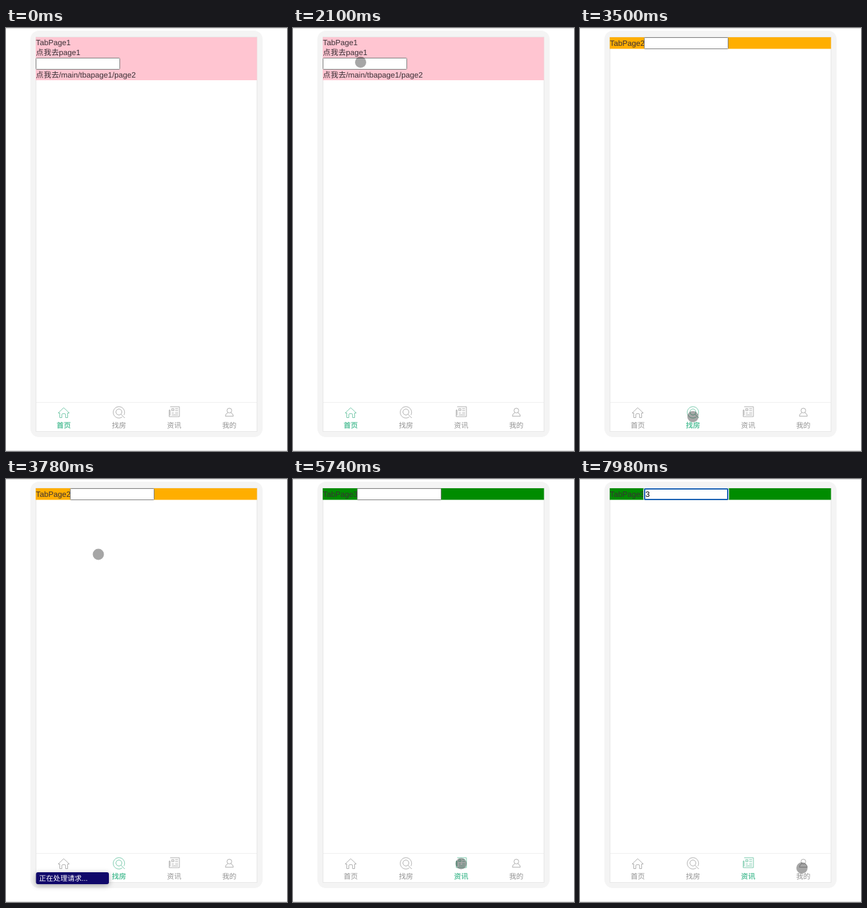
Recreate the animation shown at these times as an HTML page. Size 426x640 px, loop 8000 ms.

```html
<!DOCTYPE html>
<html lang="zh">
<head>
<meta charset="utf-8">
<title>Tab pages</title>
<style>
  html, body { margin: 0; height: 100%; overflow: hidden; background: #fff; }
  svg { display: block; width: 100%; height: 100%; }
  text {
    font: 11.7px "Liberation Sans", "Noto Sans CJK SC", "Noto Sans CJK", sans-serif;
    fill: #3a3036;
    text-rendering: geometricPrecision;
  }
  .page, .ring, .caret, .value, #toast, #dot { visibility: hidden; }
  .box { fill: #fff; stroke: #808080; }
  .ring { fill: #fff; stroke: #1c62b4; stroke-width: 2; }
  .ring .gap { fill: none; stroke: #fff; stroke-width: 1; }
  .value { fill: #000; }
  .caret { stroke: #333; }
  .tab { color: #a8a8a8; }
  .tab path, .tab circle, .tab rect { fill: none; stroke: currentColor; stroke-width: .9; }
  .tab text, #toast text { font-size: 10.8px; }
  .tab text { fill: #929292; text-anchor: middle; }
  .tab.on { color: #6cc5a4; }
  .tab.on text { fill: #5cc39e; font-weight: bold; }
  #toast rect { fill: #10086a; filter: drop-shadow(0 2px 4px rgba(0, 0, 0, .35)); }
  #toast text { fill: #fff; }
</style>
</head>
<body>
<svg viewBox="0 0 426 640">
  <path d="M0 .5H426M0 639.5H426" stroke="#dcdcdc"/>
  <rect x="37" y="4" width="352" height="615" rx="13" fill="#f4f4f4"/>
  <rect x="45.5" y="13.5" width="335" height="597" fill="#fff" stroke="#e8e8e8"/>

  <g class="page">
    <rect x="45" y="14" width="335.5" height="65" fill="#ffc5d1"/>
    <text x="45.3" y="25.5">TabPage1</text>
    <text x="45.3" y="41.2">点我去page1</text>
    <text x="45.3" y="75.2">点我去/main/tbapage1/page2</text>
    <g class="field" transform="translate(45 45)"></g>
  </g>
  <g class="page">
    <rect x="45" y="14" width="335.5" height="17.5" fill="#ffae00"/>
    <text x="45.3" y="26.8">TabPage2</text>
    <g class="field" transform="translate(97 14)"></g>
  </g>
  <g class="page">
    <rect x="45" y="14" width="335.5" height="17.5" fill="#008c00"/>
    <text x="45.3" y="26.8">TabPage3</text>
    <g class="field" transform="translate(97 14)"></g>
  </g>

  <path d="M46 566.5H380" stroke="#f0f0f0"/>
  <g class="tab">
    <path d="M-8.5 1L0-7 8.5 1H6V8H2.8V3.5Q2.8 2 1.3 2H-1.3Q-2.8 2-2.8 3.5V8H-6V1Z" stroke-linejoin="round"/>
    <text y="23">首页</text>
  </g>
  <g class="tab">
    <path d="M5 7A8.6 8.6 0 1 1 7.6 4M3.2 2.8L8 8H9"/>
    <circle cy="-.5" r="4.5"/>
    <text y="23">找房</text>
  </g>
  <g class="tab">
    <path d="M-6-8.5H8V6.5H-7.5V-3.5H-6V4.5M1.5-5.5H6M1.5-2.5H6M-3.5 1H-.5M1.5 1H6M-3.5 3.8H6"/>
    <rect x="-3.5" y="-5.5" width="3" height="3"/>
    <text y="23">资讯</text>
  </g>
  <g class="tab">
    <circle cy="-2.7" r="3.6"/>
    <path d="M-2.2 .5Q-6 2-6 5.8H6Q6 2 2.2 .5" stroke-linejoin="round"/>
    <text y="23">我的</text>
  </g>

  <g id="toast">
    <rect x="45.5" y="595" width="110.5" height="18" rx="3"/>
    <text x="50" y="608">正在处理请求...</text>
  </g>
  <circle id="dot" r="8.5" fill="#000" fill-opacity=".35"/>
</svg>
<script>
const LOOP = 8000, STEP = 70, APPEAR = 280;
const tabX = i => 87.5 + 83.7 * i;

const pages = [
  { from: 0, focus: 2310, typed: 2650 },
  { from: 3500, focus: 4620, typed: 4750 },
  { from: 5740, focus: 6860, typed: 6990 }
];

// Pointer gestures; it rests where the last one ended
const moves = [
  { at: 280, ms: 70, to: [97, 147] },
  { at: 490, ms: 420, to: [117, 54] },
  { at: 1890, ms: 210, to: [102.5, 51.7] },
  { at: 2380, ms: 420, to: [150.5, 509] },
  { at: 2870, ms: 350, to: [tabX(1), 588] },
  { at: 3500, ms: 280, to: [140, 114] },
  { at: 3780, ms: 490, to: [127, 22] },
  { at: 4690, ms: 140, to: [127, 74.5] },
  { at: 5110, ms: 420, to: [tabX(2), 582] },
  { at: 5740, ms: 560, to: [159, 51] },
  { at: 6300, ms: 280, to: [142, 32] },
  { at: 7140, ms: 350, to: [403, 620] },
  { at: 7560, ms: 350, to: [336.5, 588.5] }
];

const all = s => [...document.querySelectorAll(s)];
const show = (el, on) => el.style.visibility = on ? "visible" : "hidden";
const ease = p => p * p * (3 - 2 * p);

all(".field").forEach((f, i) => f.innerHTML = `
  <rect class="box" x=".5" y=".5" width="127" height="17" rx="1"/>
  <g class="ring">
    <rect class="gap" x="-.5" y="-.5" width="129" height="19" rx="2"/>
    <rect x="1" y="1" width="126" height="16" rx="1.5"/>
  </g>
  <text class="value" x="2.3" y="12.8">${i + 1}</text>
  <path class="caret"/>`);

const pageEls = all(".page"), tabs = all(".tab"), rings = all(".ring"),
  values = all(".value"), carets = all(".caret"),
  toast = document.getElementById("toast"), dot = document.getElementById("dot");

tabs.forEach((tab, i) => tab.setAttribute("transform", `translate(${tabX(i)} 581.5)`));

function pointer(t) {
  let pos = [322, 509];
  for (const { at, ms, to } of moves) {
    if (t < at) break;
    const e = ease(Math.min(1, (t - at) / ms));
    pos = pos.map((v, k) => v + (to[k] - v) * e);
  }
  return pos;
}

function draw(t) {
  const current = pages.filter(p => t >= p.from).length - 1;
  pages.forEach(({ focus, typed }, i) => {
    const on = i === current, full = t >= typed;
    const blink = (t - (full ? typed : focus)) % 1000 < 500;
    show(pageEls[i], on);
    show(rings[i], on && t >= focus);
    show(values[i], on && full);
    show(carets[i], on && t >= focus && blink);
    carets[i].setAttribute("d", `M${full ? 8.5 : 2.5} 3V15`);
  });
  tabs.forEach((tab, i) => tab.classList.toggle("on", i === current));
  show(toast, t >= 3640 && t < 4130);
  show(dot, t >= APPEAR);
  dot.setAttribute("transform", `translate(${pointer(t)})`);
}

const start = performance.now();
function tick() {
  const t = (performance.now() - start) % LOOP;
  draw(Math.floor(t / STEP) * STEP);
  requestAnimationFrame(tick);
}
tick();
</script>
</body>
</html>
```
